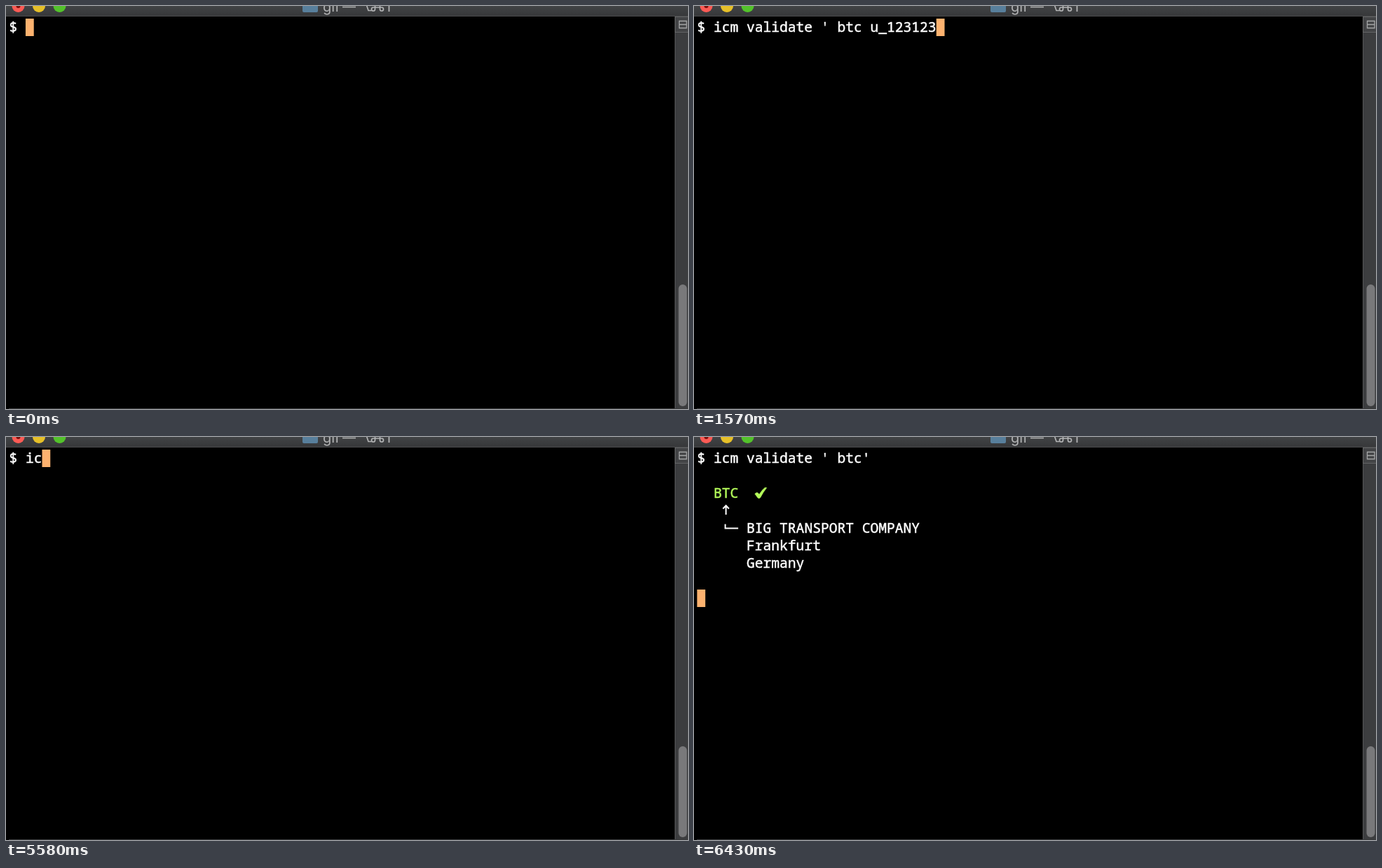
An HTML page that plays this animation: 973 px wide and 576 px high, repeating every 8 s.

```html
<!DOCTYPE html>
<html lang="en">
<head>
<meta charset="utf-8">
<title>Terminal</title>
<style>
html, body { margin: 0; width: 100%; height: 100%; overflow: hidden; background: #000; }
svg { display: block; width: 973px; height: 576px; }
text { white-space: pre; }
.term { font: 19.617px "Noto Sans Mono", "DejaVu Sans Mono", monospace; fill: #fff; }
.term text { stroke: #fff; stroke-width: .5; }
.term .ok { fill: #b4fb5a; stroke: #b4fb5a; stroke-width: .5; }
.line { fill: none; stroke: #fff; stroke-width: 2; }
.title { font: 20px Inter, "Open Sans", sans-serif; fill: #b3b4b5; }
.keys { fill: none; stroke: #b3b4b5; stroke-width: 1.7; }
</style>
</head>
<body>
<svg viewBox="0 0 973 576">
  <defs>
    <linearGradient id="bar" x2="0" y2="1">
      <stop offset="0" stop-color="#414345"/>
      <stop offset="1" stop-color="#37383a"/>
    </linearGradient>
    <path id="check" d="M0 9.3 Q2 6.6 4.4 7.8 L6.2 10 Q10 3.5 14.5 .2 L17 .6 Q11.5 7.5 8 14.5 Q6 16.8 4 14.8 Z"/>
    <path id="arrow" d="M0 14 V1 M-4.3 5.5 L0 1 L4.3 5.5"/>
    <path id="elbow" d="M-1 -6 V0 H17.5"/>
  </defs>

  <rect width="973" height="576" fill="#000"/>
  <rect y="575" x="4" width="969" height="1" fill="#38393a"/>

  <rect width="973" height="14" fill="url(#bar)"/>
  <rect y="14" width="973" height="1" fill="#4a4b4c"/>
  <circle cx="17.5" r="9" fill="#fc5b55"/>
  <circle cx="17.5" r="3" fill="#7a100c"/>
  <circle cx="47" r="9" fill="#e6c029"/>
  <circle cx="76.5" r="9" fill="#53c22b"/>
  <path d="M423 0 H445 V7 Q445 9 443 9 H425 Q423 9 423 7 Z" fill="#587f9c"/>
  <text class="title" x="452" y="7.5">gif</text>
  <text class="title" x="541" y="7.5">1</text>
  <path class="keys" d="M480 1.5 H499 M510 -7 H512.5 L517 6.5 H521.5"/>
  <path class="keys" d="M526.5 -6 V4.5 A2.5 2.5 0 1 1 524 2 H536 A2.5 2.5 0 1 1 533.5 4.5 V-6"/>

  <rect x="954" y="15" width="19" height="560" fill="#3c3d3f"/>
  <rect x="954" y="15" width="1" height="560" fill="#545556"/>
  <rect x="954.5" y="15.5" width="19" height="22" fill="#434446" stroke="#646566"/>
  <path d="M960.5 21.5 H971 V31.5 H960.5 Z M960 26.5 H971" fill="none" stroke="#a5a6a7" stroke-width="1.3"/>
  <rect id="thumb" x="959.5" y="398" width="12" height="174" rx="6" fill="#79797b"/>

  <g class="term">
    <rect id="cursor" width="11.77" height="25" fill="#fdb26f"/>
    <text id="prompt" x="4.4" y="37"></text>
    <text id="prompt2" x="4.4" y="287">$</text>
    <g id="long"></g>
    <g id="short"></g>
  </g>
</svg>
<script>
const CELL = 11.77, LEFT = 4.4, TOP = 18, ROW = 25, LOOP = 8000;
const $ = id => document.getElementById(id);
const colX = c => LEFT + c * CELL;
const rowY = r => TOP + r * ROW;

const label = (c, r, s, cls = "") =>
  `<text class="${cls}" x="${colX(c)}" y="${rowY(r) + 19}">${s}</text>`;
const mark = (id, x, y, cls = "line") =>
  `<use href="#${id}" class="${cls}" x="${x}" y="${y}"/>`;
const arrow = (c, r) => mark("arrow", colX(c + .5), rowY(r) + 4);
const elbow = (c, r) => mark("elbow", colX(c + .5), rowY(r) + 12.5);
const check = c => mark("check", colX(c), rowY(2) + 4, "ok");
const stem = r => `<path class="line" d="M${colX(3.5)} ${rowY(r) + 4} v16"/>`;
const owner = r => elbow(3, r) + label(6, r, "BIG TRANSPORT COMPANY") +
  label(6, r + 1, "Frankfurt") + label(6, r + 2, "Germany");

$("long").innerHTML = label(2, 2, "BTC U 123123 3", "ok") + check(18) +
  arrow(3, 3) + arrow(6, 3) + stem(4) + stem(5) +
  elbow(6, 4) + label(9, 4, "freight container") + owner(6);
$("short").innerHTML = label(2, 2, "BTC", "ok") + check(7) + arrow(3, 3) + owner(4);

// [time, characters on the command line]
const first = [[0, 2], [380, 4], [470, 6], [560, 8], [650, 10], [740, 12], [830, 14],
  [930, 16], [1020, 18], [1110, 21], [1200, 23], [1390, 25], [1480, 27], [1570, 29],
  [1660, 31], [1760, 32]];
const second = [[5120, 2], [5580, 4], [5670, 6], [5760, 8], [5850, 10], [5940, 12],
  [6030, 14], [6120, 17], [6180, 19], [6240, 21]];
const runs = [
  { cmd: "$ icm validate ' btc u_123123-3'", keys: first, enter: 1950, done: 2050, endRow: 10 },
  { cmd: "$ icm validate ' btc'", keys: second, enter: 6330, done: 6430, endRow: 8 }
];

const show = (id, on) => $(id).setAttribute("visibility", on ? "visible" : "hidden");

function draw(t) {
  const run = runs[t < 5120 ? 0 : 1];
  const count = run.keys.filter(k => k[0] <= t).pop()[1];
  const back = t >= 5060 && t < 5120;
  let col = count, row = 0;
  if (t >= run.enter) { col = 0; row = 1; }
  if (t >= run.done) row = run.endRow;
  if (back) col = 2;

  $("prompt").textContent = run.cmd.slice(0, count);
  $("cursor").setAttribute("x", colX(col));
  $("cursor").setAttribute("y", rowY(row));
  show("prompt2", back);
  show("long", t >= 2050 && t < 5120);
  show("short", t >= 6430);
  const y = t < 5220 ? 398 : 442;
  $("thumb").setAttribute("y", y);
  $("thumb").setAttribute("height", 572 - y);
}

const start = performance.now();
function tick() {
  draw((performance.now() - start) % LOOP);
  requestAnimationFrame(tick);
}
draw(0);
requestAnimationFrame(tick);
</script>
</body>
</html>
```
